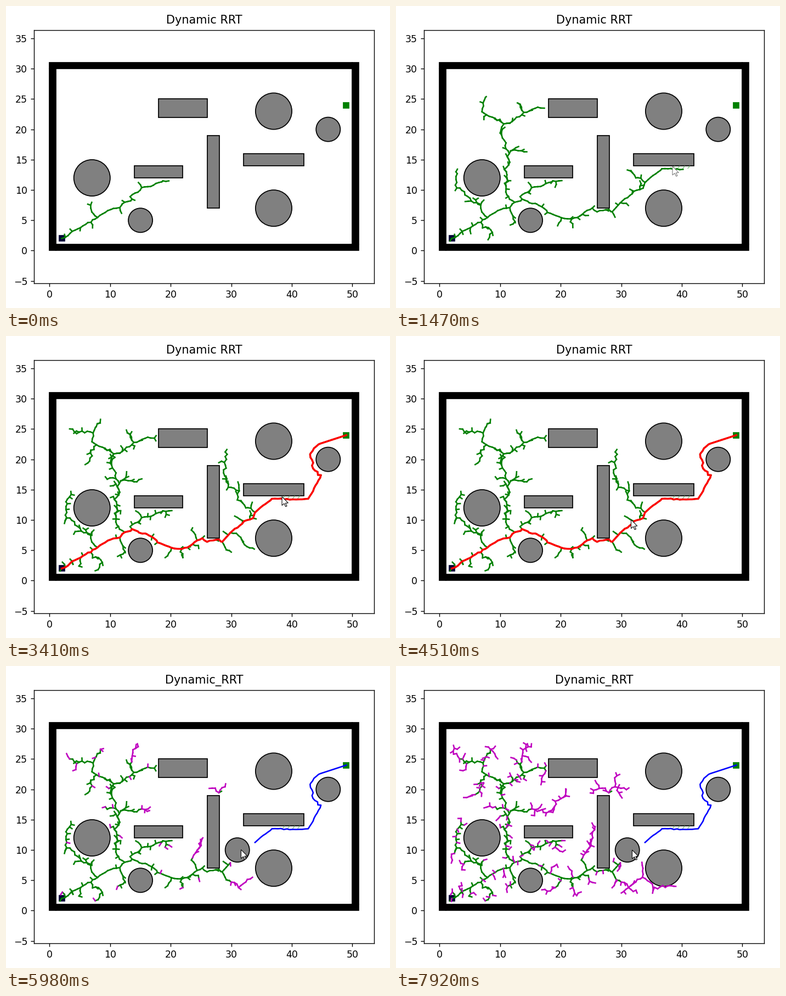
Write a matplotlib script that moves like this. It is 700 px wide and 550 px high and loops after 8000 ms.

```python
import numpy as np
import matplotlib.pyplot as plt
from matplotlib.animation import FuncAnimation
from matplotlib.collections import LineCollection
from matplotlib.patches import Circle, Polygon, Rectangle

DPI, W, H = 125, 700, 550
STEP_MS, LOOP_MS = 40, 8000
SOLVED, CLICK, REPLAN = 2920, 4360, 5520
LEFT, BOTTOM, AX_W, AX_H = 51.33, 45.14, 619.34, 461
EDGE = .5                    # tree edge length in map units
MARGIN = .4                  # clearance of new nodes

rng = np.random.default_rng(11)

WALLS = [(0, 0, 1, 30), (0, 30, 50, 1), (1, 0, 50, 1), (50, 1, 1, 30)]
BOXES = [(14, 12, 8, 2), (18, 22, 8, 3), (26, 7, 2, 12), (32, 14, 10, 2)]
DISCS = [(7, 12, 3), (46, 20, 2), (15, 5, 2), (37, 7, 3), (37, 23, 3)]
BLOCK = (31, 10, 2)

fig = plt.figure(figsize=(W / DPI, H / DPI), dpi=DPI, facecolor="white")
ax = fig.add_axes([LEFT / W, BOTTOM / H, AX_W / W, AX_H / H])
half = AX_H / AX_W * 56.1 / 2
ax.set(xlim=(-2.55, 53.55), ylim=(15.5 - half, 15.5 + half),
       xticks=range(0, 51, 10), yticks=range(-5, 36, 5))
title = ax.set_title("Dynamic RRT", pad=7)


def add_disc(x, y, r):
    return ax.add_patch(Circle((x, y), r, fc="gray", ec="black"))


for face, rects in (("black", WALLS), ("gray", BOXES)):
    for x, y, w, h in rects:
        ax.add_patch(Rectangle((x, y), w, h, fc=face, ec="black"))
for disc in DISCS:
    add_disc(*disc)
block = add_disc(*BLOCK)
ax.plot(2, 2, "s", color="#000038")
ax.plot(49, 24, "gs")


class Tree:
    """Random tree: limbs follow key points, twigs sprout by sampling."""

    def __init__(self, start):
        self.xy = np.array([start], float)
        self.born = np.zeros(1)
        self.depth = np.zeros(1, int)
        self.discs = list(DISCS)
        self.edges = []

    def add(self, i, q, t, depth):
        self.edges.append(((self.xy[i], q), t))
        self.xy = np.vstack([self.xy, q])
        self.born = np.append(self.born, t)
        self.depth = np.append(self.depth, depth)
        return len(self.xy) - 1

    def nearest(self, p, t):
        d = np.hypot(*(self.xy - p).T)
        return np.argmin(np.where(self.born <= t, d, np.inf))

    def free(self, p):
        x, y = p
        m = MARGIN
        return (1 + m < x < 50 - m and 1 + m < y < 30 - m
                and all(np.hypot(x - a, y - b) > r + m
                        for a, b, r in self.discs)
                and not any(a - m < x < a + w + m and b - m < y < b + h + m
                            for a, b, w, h in BOXES))

    def limb(self, t0, t1, *keys, noise=.35):
        """Walk from the nearest node through the key points."""
        root = self.nearest(keys[0], 1e6)
        walk = [self.xy[root]]
        for key in np.array(keys, float):
            while np.hypot(*(gap := key - walk[-1])) > 1.3 * EDGE:
                a = np.arctan2(gap[1], gap[0]) + rng.normal(0, noise)
                walk.append(walk[-1] + EDGE * np.array([np.cos(a), np.sin(a)]))
            walk.append(key)
        t0 = max(t0, self.born[root])
        for q, t in zip(walk[1:], np.linspace(t0, max(t0, t1), len(walk) - 1)):
            root = self.add(root, q, t, 0)
        return walk

    def sprout(self, t0, t1, count, depth):
        """Step from the nearest node towards random samples."""
        for t in np.linspace(t0, t1, count):
            for _ in range(200):
                p = rng.uniform((1, 1), (36, 29))
                i = self.nearest(p, t)
                gap = p - self.xy[i]
                q = self.xy[i] + EDGE * gap / np.hypot(*gap)
                if self.depth[i] < depth and self.free(q):
                    self.add(i, q, t, self.depth[i] + 1)
                    break

    def cut(self):
        """Drop everything behind the new obstacle; return what is kept."""
        def lost(p):
            return p[0] > 30 or (p[0] > 28.2 and p[1] > 13)
        self.born[[lost(p) for p in self.xy]] = np.inf
        self.discs.append(BLOCK)
        kept = [e for e in self.edges if not lost(e[0][1])]
        self.edges = []
        return kept


tree = Tree((2, 2))

# Trunk
path = tree.limb(0, 0, (2.6, 2.2), (7.5, 5.2), (9.6, 6.6), (11.6, 7.1),
                 (12, 7.7), (13.6, 8.5), noise=.2)
tree.limb(0, 0, (13.3, 8.9), (15.2, 10.4), (18.7, 11.5), noise=.2)
tree.limb(0, 0, (7.3, 6), (6.8, 7))
tree.sprout(0, 0, 16, 2)

# Route to the goal
path += tree.limb(80, 1400, (14.8, 7.9), (16, 7.7), (17.8, 6.3), (21.8, 5.2),
                  (25.2, 7), (26, 6.4), (28.5, 6.4), (32.1, 9.8), (33.6, 10.3),
                  (34.1, 11.4), (36.7, 13.5), (40.2, 13.4), noise=.2)[1:]
path += tree.limb(1500, 2300, (42.7, 13.5), (44.8, 17.4), noise=.1)[1:]
path += tree.limb(2320, 2800, (43.5, 18.5), (43.1, 21), (44.7, 22.6))[1:]
path += tree.limb(2820, 2880, (49, 24), noise=0)[1:]

# Other limbs up to the first solution
tree.limb(80, 1100, (11.1, 9.2), (10.7, 13.4), (11.5, 16), (10, 19.4),
          (10.6, 20.9), (12.7, 22), (17.3, 23.5))
tree.limb(80, 1100, (6.6, 7.7), (4.1, 9.7), (2.6, 10.8), (2.7, 13))
tree.limb(80, 1200, (7.6, 3.9), (8.7, 3), (8, 1.8))
tree.limb(80, 1400, (9.5, 21.5), (7, 22.9), (7.7, 25.4))
tree.limb(80, 1400, (13, 24.3))
tree.limb(80, 1400, (12.5, 16.6), (14.4, 16.3))
tree.limb(80, 1400, (12.5, 4.6))
tree.limb(80, 1400, (22, 3.8))
tree.limb(80, 1400, (32.4, 12), (31.6, 13.2))
tree.sprout(160, 1400, 85, 3)

tree.limb(1500, 2440, (31.3, 14.8), (29.5, 15.4), (28.9, 17.3), (29.2, 20))
tree.limb(1500, 2440, (4, 24.3))
tree.limb(1500, 2440, (8.4, 26.6))
tree.limb(1500, 2440, (6.3, 19.4))
tree.limb(1500, 2440, (23.6, 8.7))
tree.limb(1500, 2440, (30, 4.7))
tree.sprout(1500, 2460, 70, 4)

tree.limb(2500, 2880, (31.7, 6.8), (33.8, 5.2))
tree.sprout(2500, 2880, 18, 4)
green, green_kept = list(tree.edges), tree.cut()

# Regrowth around the new obstacle
tree.limb(5600, 5920, (31.2, 3.8), (33.5, 5.5))
tree.limb(5600, 5920, (24.9, 10.6), (25.3, 12))
tree.limb(5600, 5920, (2.8, 25.9))
tree.limb(5600, 5920, (14.3, 27.4))
tree.limb(5600, 5920, (16.5, 16.5))
tree.sprout(5600, 5920, 50, 6)

tree.limb(6000, 6880, (36, 3.6))
tree.limb(6000, 6880, (25.4, 14))
tree.limb(6000, 6880, (18.7, 16.2), (19.6, 18.2))
tree.sprout(6000, 6880, 120, 8)

tree.limb(6960, 7900, (39, 4))
tree.limb(6960, 7900, (20.9, 20))
tree.sprout(6960, 7900, 100, 10)
magenta = tree.edges


def layer(color, lw=1.5):
    lines = LineCollection([], colors=color, linewidths=lw,
                           capstyle="projecting")
    ax.add_collection(lines, autolim=False)
    return lines


path = np.array(path)
faint = layer("#8cc48c", .9)
green_lines, magenta_lines = layer("green"), layer("m")
red_line, = ax.plot(*path.T, "r-", lw=2, zorder=3)
blue_line, = ax.plot(*path[np.argmax(path[:, 0] > 33.8):].T, "b-", zorder=3)
STUBS = [[(x, 13.6), (x + .3, 13.9)] for x in np.linspace(38.5, 41, 4)]

# Mouse pointer and click highlight, in pixels
stage = fig.add_axes([0, 0, 1, 1])
stage.set(xlim=(0, W), ylim=(H, 0))
stage.axis("off")
ARROW = np.array([(0, 0), (0, 16), (4, 12.5), (6.7, 18.2), (9, 17.2),
                  (6.4, 11.8), (11.3, 11.5)])
halo = stage.add_patch(Circle((428, 334), 15, fc=(1, 1, 0, .47), ec="none"))
arrow = stage.add_patch(Polygon(ARROW, fc="white", lw=.6, zorder=2))


def glide(a, b, t, t0, t1):
    u = np.clip((t - t0) / (t1 - t0), 0, 1)
    return np.array(a) + (np.array(b) - a) * u * u * (3 - 2 * u)


def pointer(t):
    if t < 3400:
        return glide((676, 372), (504, 292), t, 840, 1400)
    if t < 6320:
        return glide((504, 292), (428.5, 334.5), t, 3360, 3960)
    return np.array((430.5, 335))


def update(i):
    t = i * STEP_MS
    now = t - t % 80
    replan = t >= REPLAN
    title.set_text("Dynamic_RRT" if replan else "Dynamic RRT")
    green_lines.set_segments([s for s, b in (green_kept if replan else green)
                              if b <= now])
    magenta_lines.set_segments([s for s, b in magenta if b <= now])
    faint.set_segments(STUBS if t >= 1400 else [])
    red_line.set_visible(SOLVED < t < REPLAN)
    blue_line.set_visible(replan)
    block.set_visible(replan)
    halo.set_visible(CLICK <= t < CLICK + 120)
    arrow.set_visible(t >= 840)
    arrow.set_xy(ARROW + pointer(t))
    arrow.set_edgecolor("#777777" if t < 3400 else "black")
    return ()


anim = FuncAnimation(fig, update, frames=LOOP_MS // STEP_MS, interval=STEP_MS,
                     repeat=True, repeat_delay=0)
plt.show()
```
